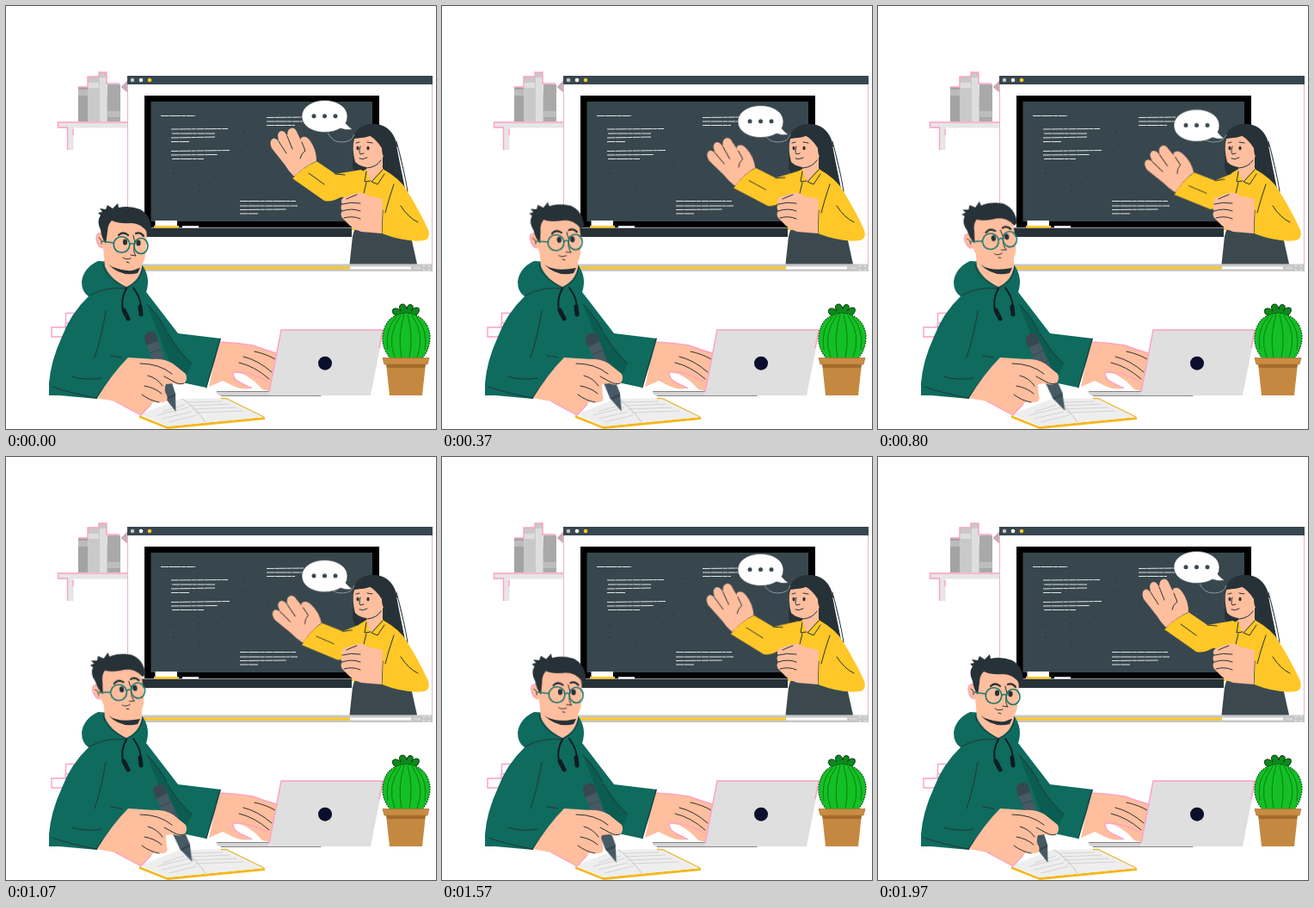
An HTML page without scripts for the animation above (2.01 s loop, 500 px wide and 491 px high).

```html
<!DOCTYPE html>
<html lang="en">
<head>
<meta charset="utf-8">
<title>Online lesson</title>
<style>
html, body { margin: 0; width: 100%; height: 100%; overflow: hidden; background: #fff; }
svg { display: block; width: 500px; height: 491px; }
.ink { fill: none; stroke: #263238; stroke-width: 1; stroke-linecap: round; stroke-linejoin: round; }
.dark { fill: #263238; }
.skin { fill: #ffbe9d; }
.shirt { fill: #ffc727; }
.hoodie { fill: #0e6b5e; }
.pink { fill: none; stroke: #ff9fc6; stroke-width: 1.4; }
.chalk { fill: none; stroke: #dfe5e6; stroke-width: 1; stroke-dasharray: 9 .5 14 .4 5 .6; }
.faint { fill: none; stroke: #263036; stroke-width: .9; stroke-dasharray: 1 5 2 7; }

.bubble, .arm, .head, .pen { animation: 2010ms infinite; }
.bubble { animation-name: drop; }
.arm { animation-name: wave; transform-origin: 421px 160px; }
.head { animation-name: nod; transform-origin: 112px 295px; }
.pen { animation-name: write; transform-origin: 197px 289px; }
@keyframes drop {
  0%, 100% { transform: translateY(0); animation-timing-function: ease-out; }
  50% { transform: translateY(11.4px); animation-timing-function: ease-out; }
}
@keyframes wave {
  0%, 100% { transform: rotate(0); animation-timing-function: ease-out; }
  50% { transform: rotate(-14deg); animation-timing-function: ease-out; }
}
@keyframes nod {
  0%, 100% { transform: rotate(0); animation-timing-function: ease-out; }
  50% { transform: rotate(-11deg); animation-timing-function: ease-out; }
}
@keyframes write {
  0%, 100% { transform: rotate(0); animation-timing-function: ease-out; }
  50% { transform: rotate(-6.7deg); animation-timing-function: ease-out; }
}
</style>
</head>
<body>
<svg viewBox="0 0 500 491">
  <!-- shelf and books -->
  <g>
    <path fill="#e6e6e6" d="M60 135H142V141.500H60zM71 141H78.500V167H71z"/>
    <path class="pink" d="M142 135H60.500V141H71.500V167M78 143V150"/>
    <path fill="#a3a3a3" d="M84 94H96V134H84z"/>
    <path fill="#bcbcbc" d="M84 97H96V104H84z"/>
    <path fill="#c9c9c9" d="M95 82H108V77H117V82L119 134H95z"/>
    <path fill="#dedede" d="M95 89H108V95H95zM109 83H117V134H109z"/>
    <path fill="#a9a9a9" d="M118 91H133V134H118z"/>
    <path fill="#bdbdbd" d="M118 122H133V129H118z"/>
    <path class="pink" d="M84 94H95V82H108V77H117V90H132"/>
    <path fill="#b5b5b5" stroke="#ff9fc6" d="M141 87L134 94L141 100z"/>
    <path class="pink" d="M88 356.500H69.500V368H86M78 373H53V384H76M69 368V373"/>
  </g>

  <!-- video window -->
  <path fill="#fff" stroke="#e3b9c8" d="M141.500 88H495.500V307H141.500z"/>
  <path fill="#37474f" d="M141 81H496V91H141z"/>
  <circle cx="147" cy="86" r="2.300" fill="#c4c4c4"/>
  <circle cx="157" cy="86" r="2.300" fill="#fff"/>
  <circle cx="167" cy="86" r="2.300" fill="#ffc727"/>
  <path fill="#c7c7c7" d="M141 299.500H496V308H141z"/>
  <path fill="#ffc727" d="M150 302.500H400V305.500H150z"/>
  <path fill="#fff" d="M400 302.500H471V305.500H400z"/>
  <path fill="none" stroke="#e5e5e5" d="M474 304H482M485.500 303V301H488M490 301H492.500V303M492.500 305V307H490M488 307H485.500V305"/>

  <!-- board -->
  <path d="M161 104H434V257H161z"/>
  <path fill="#38474e" d="M168.500 111H426V250H168.500z"/>
  <path class="dark" d="M157 257.500H402V268H157z"/>
  <path fill="#fff" d="M173.500 249H199V255H173.500zM205 255.300H224V257.500H205z"/>
  <path fill="#ffc727" d="M172 255H201V257.500H172z"/>
  <path class="chalk" d="M180 127.500H220M192 143L258 142.500M193 148H243M192 153L243 152M192 157.500H213M192 168.500L260 167.500M192 173L246 172.500M193 177.500H230M303 129.500L346 129M303 134H345M303 138.500H336M272 226.500H337M272 232H339M272 236.500L326 236M272 241H293"/>
  <path class="faint" d="M266 189L285 141M278 140L274 160M195 188V222M223 178L225 221M303 168L310 186M255 180L237 205"/>

  <!-- teacher -->
  <path class="dark" d="M404 153Q408 138 425 137Q444 136 452 153Q459 171 462 201Q465 219 472 233L418 235L403 187z"/>
  <path fill="#3b494f" d="M408 250L403 267L399.500 299.500H478L471 268L445 235z"/>
  <g class="arm">
    <path class="shirt" d="M361 180L383 195L413 190L430 203L420 222L389 222Q378 228 370 226L333 200Q345 187 361 180z"/>
    <path class="ink" d="M361 180Q344 187 334 199M352 194L370 207M383 195L394 196"/>
    <path class="skin" d="M335 198Q328 191 324 184L309 165Q306 158 309 155Q312 151 317 157L316 150Q317 145 321 145Q324 145 327 151Q327 143 331 142Q336 140 339 148L344 158Q341 153 345 152Q350 151 354 157Q361 167 361 180Q347 186 335 198z"/>
    <path class="ink" d="M317 157L326 171M327 151L333 166M344 158L348 168Q343 171 342 177"/>
  </g>
  <path class="shirt" d="M411 194L421 188L438 189Q459 201 466 214Q481 238 491 260Q494 270 486 272Q466 275 437 264V260H402L402 230L408 216z"/>
  <path class="ink" d="M451 207Q445 224 441 240M459 232Q468 246 479 251M437 264L438 237M419 205L412 234"/>
  <path class="skin" d="M420 181L438 172L438 190L425 205L419 193z"/>
  <path class="shirt" d="M419 191L412 195L415 206L423 202zM438 188L425 204L432 207L441 195z"/>
  <path class="ink" d="M419 192L417 204L424 203M438 190L425 204L432 207L440 195"/>
  <path class="skin" d="M405 153Q416 154 425 150Q437 153 440 162Q444 166 439 174Q435 185 425 187Q413 188 406 181Q402 166 405 153z"/>
  <path class="dark" d="M403 159Q404 139 425 137Q446 137 450 156L447 179Q437 179 437 165Q431 155 422 150Q413 153 405 154z"/>
  <path class="ink" d="M412 163Q410 169 412 172L416 171M411 177Q415 179 420 176M407 159L411 158M420 158L426 159M420 188Q431 187 436 179"/>
  <ellipse class="dark" cx="409" cy="165" rx="1.500" ry="2.200"/>
  <ellipse class="dark" cx="421" cy="165" rx="1.600" ry="2.200"/>
  <path class="skin" d="M437 264L413 262Q403 259 397 252L391 246Q388 241 391 238Q388 233 391 230Q388 225 393 222L408 217Q417 216 420 220L438 224z"/>
  <path class="ink" d="M391 230Q401 227 412 229M391 238Q402 234 412 238M393 246Q403 243 412 247M408 219Q400 222 396 224"/>
  <path fill="none" stroke="#fff" stroke-width="1.400" d="M455 163Q460 190 465 212"/>
  <path class="ink" d="M454 157Q463 190 467 215"/>

  <path fill="none" stroke="#8b979d" stroke-width="1" d="M374 147Q379 158 390 158Q403 158 405 149"/>
  <g class="bubble">
    <path fill="#fff" stroke="#263238" stroke-width=".6" d="M370.500 109.500C385 109.500 397 117 397 128Q397 133 395 136Q399 141 403 143Q396 145 389 142Q381 146.500 370.500 146.500C356 146.500 344 139 344 128S356 109.500 370.500 109.500z"/>
    <g fill="#37474f"><circle cx="358" cy="127.700" r="2.500"/><circle cx="370.500" cy="127.700" r="2.500"/><circle cx="383" cy="127.700" r="2.500"/></g>
  </g>

  <!-- notebook -->
  <path fill="#f4b81f" d="M155 475L187 488L301 477V480L188 491L155 478z"/>
  <path fill="#eeeeee" d="M156 474L202 456L255 455L300 477L188 488z"/>
  <path fill="none" stroke="#e9b63a" stroke-width="1.300" d="M250 455.500H256L300 477"/>
  <path fill="none" stroke="#d0d0d0" stroke-width=".9" d="M211 460L252 459M213 464L260 462M216 468L268 466M220 472L276 470M182 471L207 463M176 475L212 466M182 479L216 471M189 483L222 475"/>
  <path fill="none" stroke="#c4c4c4" d="M205 456Q220 466 232 483"/>

  <!-- far hand -->
  <path class="skin" d="M247 390Q270 391 287 394Q300 399 320 404L307 447L298 445Q288 433 275 427L264 425Q264 433 272 437L285 443Q278 447 264 441L252 435L236 442z"/>
  <path class="pink" d="M249 390Q270 391 287 394Q301 399 314 403M264 425Q264 433 272 437L286 444M264 425Q284 424 304 436"/>
  <path class="ink" d="M276 407Q293 411 309 425M271 414Q289 418 306 433M289 401Q303 404 313 410"/>

  <!-- hoodie -->
  <path class="hoodie" d="M107 296Q90 304 88 320Q88 332 96 337Q75 357 65 384Q52 412 50 438V452H62L106 456L143 409L180 417L205 437L233 443Q242 416 250 386L200 380L163 332Q169 314 157 299z"/>
  <path fill="#0b5c51" d="M164 346Q178 358 188 380Q203 404 216 415L206 437L192 418z"/>
  <path class="ink" d="M113 300Q115 316 140 327Q157 321 159 303M97 336Q117 325 141 328M116 354Q111 385 103 408M164 346Q176 358 187 377M188 380Q203 404 216 415M249 386L233 443M142 409Q122 430 105 455M122 406L135 408M77 430Q89 435 111 432M54 442Q77 450 105 455"/>

  <!-- student -->
  <path class="skin" d="M113 280L115 302Q121 317 140 326Q155 319 158 303V285z"/>
  <path class="dark" d="M119 300Q131 309 156 304L153 310Q134 315 119 300z"/>
  <path fill="none" stroke="#101c20" stroke-width="2" stroke-linecap="round" d="M140 328Q132 342 137 357M148 327Q158 340 157 354"/>
  <path stroke="#101c20" stroke-width="5" stroke-linecap="round" d="M137 353L142 363M156 349L157 358"/>
  <g class="head">
    <ellipse class="skin" cx="111" cy="272" rx="6" ry="9"/>
    <path class="pink" d="M110 264Q105 263 105 270Q107 279 112 281"/>
    <path class="skin" d="M115 247H158L163 258Q165 272 162 290Q160 304 147 307Q129 309 117 295L112 278z"/>
    <path class="dark" d="M116 276Q111 269 110 260Q105 250 110 243L107 240L112 239L109 235L116 236L118 231L124 235L130 229L131 234Q143 231 156 236Q169 243 169 261L165 264Q158 252 145 252Q132 253 123 249Q118 254 118 262z"/>
    <path class="ink" style="stroke-width:2.200" d="M131 266Q136 261 142 266M151 264Q156 262 160 267"/>
    <ellipse class="dark" cx="138.500" cy="274" rx="2.600" ry="3.500"/>
    <ellipse class="dark" cx="154" cy="275" rx="2.600" ry="3.500"/>
    <path class="ink" d="M148 266L150 275Q147 285 151 290L145 289M136 292Q139 295 145 293M140 297L143 298M108 269Q112 271 111 276"/>
    <g fill="none" stroke="#18776d" stroke-width="1.600">
      <circle cx="134.500" cy="277" r="9.300"/>
      <ellipse cx="157" cy="278.500" rx="8" ry="9"/>
      <path d="M144 277Q146 274 149 277M125 275L112 273"/>
    </g>
  </g>

  <!-- writing hand -->
  <path class="skin" d="M142 408L173 410L192 419L186 440L187 456L171 460L157 475Q142 467 127 459L106 455Q123 427 142 408z"/>
  <g class="pen">
    <path fill="#455a64" d="M161 386Q160 380 167 378Q173 377 175 382L197 450L197.500 471L185 455z"/>
    <path fill="#37474f" d="M161 386Q160 380 167 378Q173 377 175 382L177 389L163 394zM185 455L197 450L197 453L187 457z"/>
    <path fill="none" stroke="#37474f" d="M167 403L180 399M172 416L184 412"/>
  </g>
  <path class="skin" d="M169 410Q184 409 194 415L209 427Q212 434 207 438Q202 441 195 438L186 439Q183 446 187 452Q190 461 178 460L163 454L154 420z"/>
  <path class="ink" d="M156 415Q178 415 193 427M184 430L195 436Q202 440 207 438M165 429Q176 432 182 441M161 441Q173 443 181 450M158 451Q167 458 178 460"/>
  <path class="pink" d="M127 459Q142 467 157 475L169 462"/>

  <!-- laptop -->
  <path fill="#d5d5d5" d="M245 447H310V452H367V453H250L245 450z"/>
  <path fill="none" stroke="#858585" d="M245 447.500H307M250 452.500H366"/>
  <path fill="#dfdfdf" d="M320 376H439L424 452H305z"/>
  <path class="pink" d="M306 448L320 376H438L434 397"/>
  <circle cx="371" cy="414.700" r="8" fill="#0b0e2c"/>

  <!-- cactus -->
  <path fill="#0c8a1c" stroke="#07330c" d="M456 361Q447 357 450 352Q454 349 459 354Q455 347 461 346Q465 346 466 352Q467 345 472 347Q475 350 471 354Q476 348 480 351Q482 356 474 361z"/>
  <path fill="#14c026" stroke="#07580f" stroke-width="1.200" stroke-dasharray="2 1" d="M447 409Q437 397 438 384Q440 363 457 358Q465 355 474 358Q491 364 493 383Q493 398 484 409z"/>
  <path fill="none" stroke="#07780f" stroke-width=".9" d="M459 359Q442 382 452 408M463 358Q455 384 460 408M467 358Q474 384 469 408M472 359Q488 382 478 408M454 361Q440 375 444 399M477 361Q491 376 487 399"/>
  <path fill="#c58840" d="M442 415H488L484 452H446z"/>
  <path fill="#a46b2d" d="M442 415H488L487 420H443z"/>
  <path fill="#c98c43" stroke="#a9712f" stroke-width=".7" d="M438 408.500H492L490 416H440z"/>
</svg>
</body>
</html>
```
